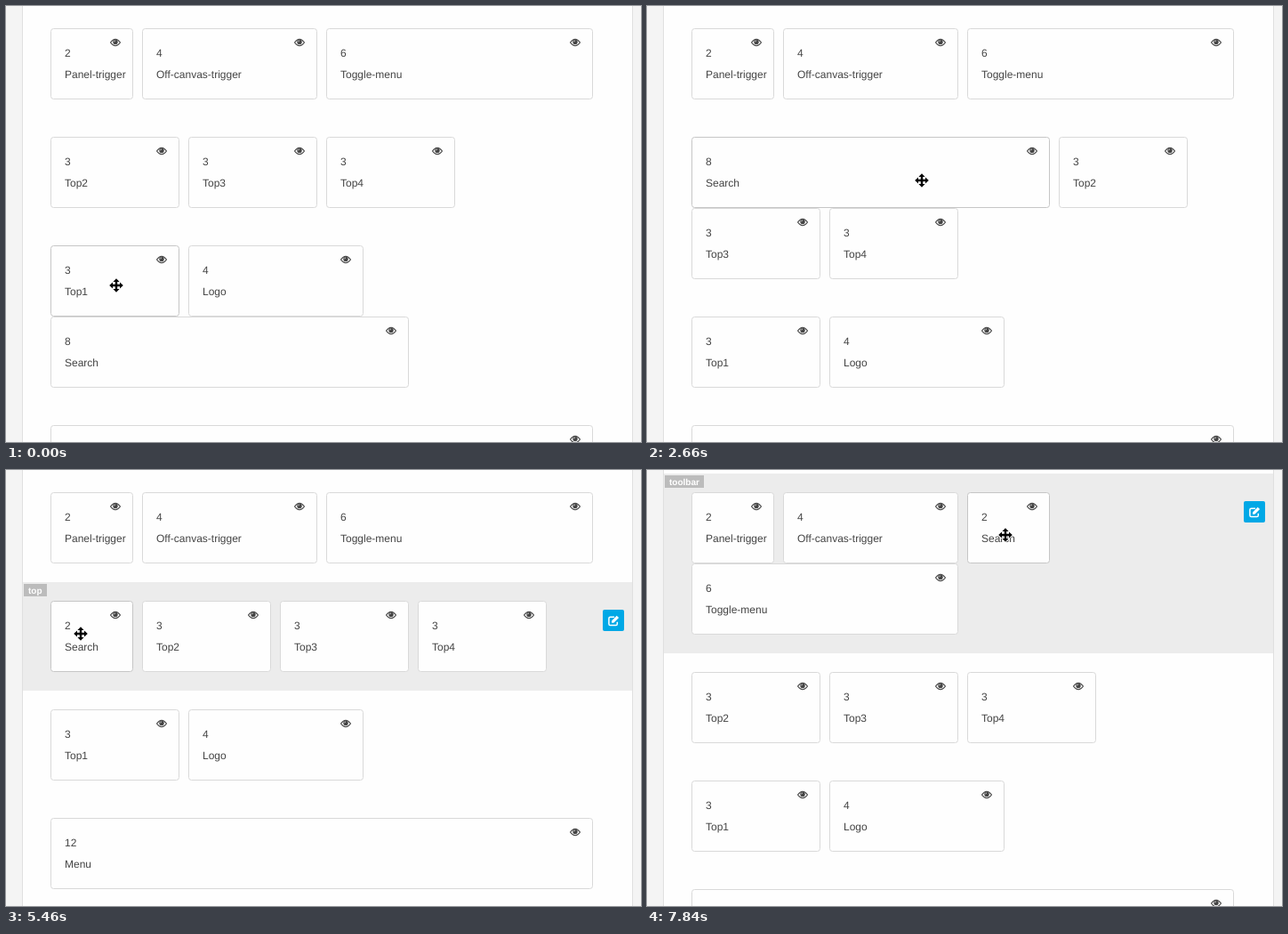
Recreate the animation shown at these times as an HTML page. Size 714x490 px, loop 8 s.

```html
<!DOCTYPE html>
<html lang="en">
<head>
<meta charset="utf-8">
<title>Layout builder</title>
<style>
html, body { margin: 0; width: 100%; height: 100%; overflow: hidden; background: #f4f4f4; }
svg { display: block; font: 12px "Liberation Sans", Arial, sans-serif; fill: #444; text-rendering: geometricPrecision; }
.card { fill: #fefefe; stroke: #d9d9d9; }
.card.hover { stroke: #c6c6c6; }
.tag { font-weight: bold; font-size: 10px; fill: #fff; }
</style>
</head>
<body>
<svg id="stage" width="714" height="490" viewBox="0 0 714 490">
  <defs>
    <g id="eye">
      <path d="M-5.5 0Q0-7.6 5.5 0Q0 7.6-5.5 0z" fill="none" stroke="#444" stroke-width="1.1"/>
      <circle cy="-.5" r="2.7"/>
      <path d="M-1.4-.7A1.5 1.5 0 0 1 0-2.1" fill="none" stroke="#fefefe" stroke-width=".7"/>
    </g>
    <g id="edit">
      <rect x="-12" y="-12" width="24" height="24" rx="2" fill="#00a8e6"/>
      <path d="M1-3.8H-3.5A1.6 1.6 0 0 0-5.1-2.2V4A1.6 1.6 0 0 0-3.5 5.6H2.7A1.6 1.6 0 0 0 4.3 4V1.8" fill="none" stroke="#fff" stroke-width="1.5"/>
      <path d="M-2 2.8V.4L3.7-5.3 6.1-2.9.4 2.8z" fill="#fff"/>
    </g>
    <path id="move" d="M0-7.8 3.6-4H1.2V-1.2H4V-3.6L7.8 0 4 3.6V1.2H1.2V4H3.6L0 7.8-3.6 4H-1.2V1.2H-4V3.6L-7.8 0-4-3.6V-1.2H-1.2V-4H-3.6z"
      fill="#000" stroke="#fff" stroke-width="1.4" paint-order="stroke"/>
  </defs>
  <rect width="714" height="490" fill="#f4f4f4"/>
  <path d="M18.5-1H704.5V491H18.5z" fill="#fefefe" stroke="#e0e0e0"/>
  <g id="scene"></g>
</svg>
<script>
const LOOP = 8000, BEAT = 147.7, LEAD = 15, LAST_BEAT = 53;
const LEFT = 50, RIGHT = 660, GAP = 10, COLUMN = 620 / 12, CARD_H = 80, PAD = 21;
const SCROLL = 108; // a dragged card floats this far above its grab point
const scene = document.getElementById('scene');

const between = (v, a, b) => v >= a && v < b;
const ramp = (v, a, b) => Math.min(1, Math.max(0, (v - a) / (b - a)));
const card = (name, size) => ({ name, size, w: size * COLUMN - GAP });

// Straight cursor moves in beats; the cursor rests in between.
const start = { x: 124, y: 314 };
const moves = [
  { from: 0, to: 4, x: 242, y: 382 },
  { from: 4, to: 10, x: 280, y: 201 },
  { from: 17, to: 18, x: 309, y: 196 },
  { from: 18, to: 24, x: 445, y: 188 },
  { from: 25, to: 30, x: 231, y: 187 },
  { from: 30, to: 32, x: 167, y: 185 },
  { from: 35, to: 37, x: 84, y: 184 },
  { from: 39, to: 43, x: 133, y: 104 },
  { from: 46, to: 53, x: 403, y: 73 }
];

function cursorAt(beat) {
  let { x, y } = start;
  for (const move of moves) {
    const k = ramp(beat, move.from, move.to);
    x += (move.x - x) * k;
    y += (move.y - y) * k;
  }
  return { x, y };
}

function searchSize(beat, x) {
  if (beat < 26) return 8;
  return beat < 32 ? Math.round((x - LEFT + GAP) / COLUMN) : 2;
}

function drawCard({ name, size, w }, left, top, pointer) {
  const x = Math.round(left), y = Math.round(top), width = Math.round(left + w) - x;
  const hover = pointer && between(pointer.x, x, x + width) && between(pointer.y, y, y + CARD_H);
  return `<rect class="card${hover ? ' hover' : ''}" x="${x + .5}" y="${y + .5}" width="${width - 1}" height="${CARD_H - 1}" rx="3"/>
    <text x="${x + 16}" y="${y + 32}">${size}</text><text x="${x + 16}" y="${y + 56}">${name}</text>
    <use href="#eye" x="${x + width - 20}" y="${y + 16}"/>`;
}

// Dashes keep their length, gaps stretch, and each corner gets a short dash.
function drawSlot(left, y, w) {
  const x = Math.round(left), dash = 12, corner = 8;
  const side = (d, length) => {
    const inner = length - 2 * corner, count = Math.floor(inner / (2 * dash));
    const gap = (inner - count * dash) / (count + 1);
    return `<path d="${d}" stroke-dasharray="${dash} ${gap}" stroke-dashoffset="${dash - corner}"/>`;
  };
  const rows = [y + 2, y + CARD_H - 2].map(v => side(`M${x} ${v}h${w}`, w));
  const columns = [x + 2, x + w - 2].map(v => side(`M${v} ${y}v${CARD_H}`, CARD_H));
  return `<g fill="none" stroke="#ddd" stroke-width="4">${rows.join('')}${columns.join('')}</g>`;
}

function drawHighlight({ label, tagWidth, glow }, top, height) {
  if (!glow) return '';
  const x = 16 + 4 * glow;
  return `<g opacity="${glow}"><rect x="19" y="${top}" width="685" height="${height}" fill="#ececec"/>
    <rect x="${x}" y="${top + 2}" width="${tagWidth}" height="14" fill="#bcbcbc"/>
    <text class="tag" x="${x + 5}" y="${top + 13}">${label}</text>
    <use href="#edit" x="683" y="${top + 43}"/></g>`;
}

function drawSection(section, top, pointer) {
  let x = LEFT, y = top + PAD, cards = '';
  for (const item of section.items) {
    if (x + item.w > RIGHT + .5) {
      x = LEFT;
      y += CARD_H;
    }
    cards += item.slot ? drawSlot(x, y, item.w) : drawCard(item, x, y, pointer);
    x += item.w + GAP;
  }
  const height = y + CARD_H + PAD - top;
  return { height, svg: drawHighlight(section, top, height) + cards };
}

function render(beat) {
  const cursor = cursorAt(beat);
  const firstDrag = between(beat, 5, 13), secondDrag = between(beat, 40, 47);
  const dragging = firstDrag || secondDrag;
  const search = card('Search', searchSize(beat, cursor.x));

  const sections = [
    { label: 'toolbar', tagWidth: 44, glow: ramp(beat, 47.5, 49.5),
      items: [card('Panel-trigger', 2), card('Off-canvas-trigger', 4), card('Toggle-menu', 6)] },
    { label: 'top', tagWidth: 26, glow: ramp(beat, 18.2, 20.2) * (1 - ramp(beat, 42.2, 44.2)),
      items: [card('Top2', 3), card('Top3', 3), card('Top4', 3)] },
    { label: 'header', tagWidth: 43, glow: ramp(beat, .6, 2.6) * (1 - ramp(beat, 8.2, 10.2)),
      items: [card('Top1', 3), card('Logo', 4)] },
    { glow: 0, items: [card('Menu', 12)] }
  ];
  const [home, index] = beat < 9 ? [2, 2] : beat < 43 ? [1, 0] : [0, 2];
  sections[home].items.splice(index, 0, dragging ? { slot: true, w: 100 } : search);

  const pointer = dragging || between(beat, 13, 18) ? null : cursor;
  let top = 4, svg = '';
  for (const section of sections) {
    const part = drawSection(section, top, pointer);
    svg += part.svg;
    top += part.height;
  }
  if (dragging) {
    const grab = firstDrag ? { x: 192, y: 33 } : { x: 34, y: 37 };
    svg += drawCard(search, cursor.x - grab.x, cursor.y - grab.y - SCROLL);
  }
  scene.innerHTML = svg + `<use href="#move" x="${Math.round(cursor.x)}" y="${Math.round(cursor.y)}"/>`;
}

let shown = -1;
function frame() {
  const time = performance.now() % LOOP;
  const beat = Math.min(LAST_BEAT, Math.floor((time + LEAD) / BEAT));
  if (beat !== shown) render(shown = beat);
  requestAnimationFrame(frame);
}
frame();
</script>
</body>
</html>
```
